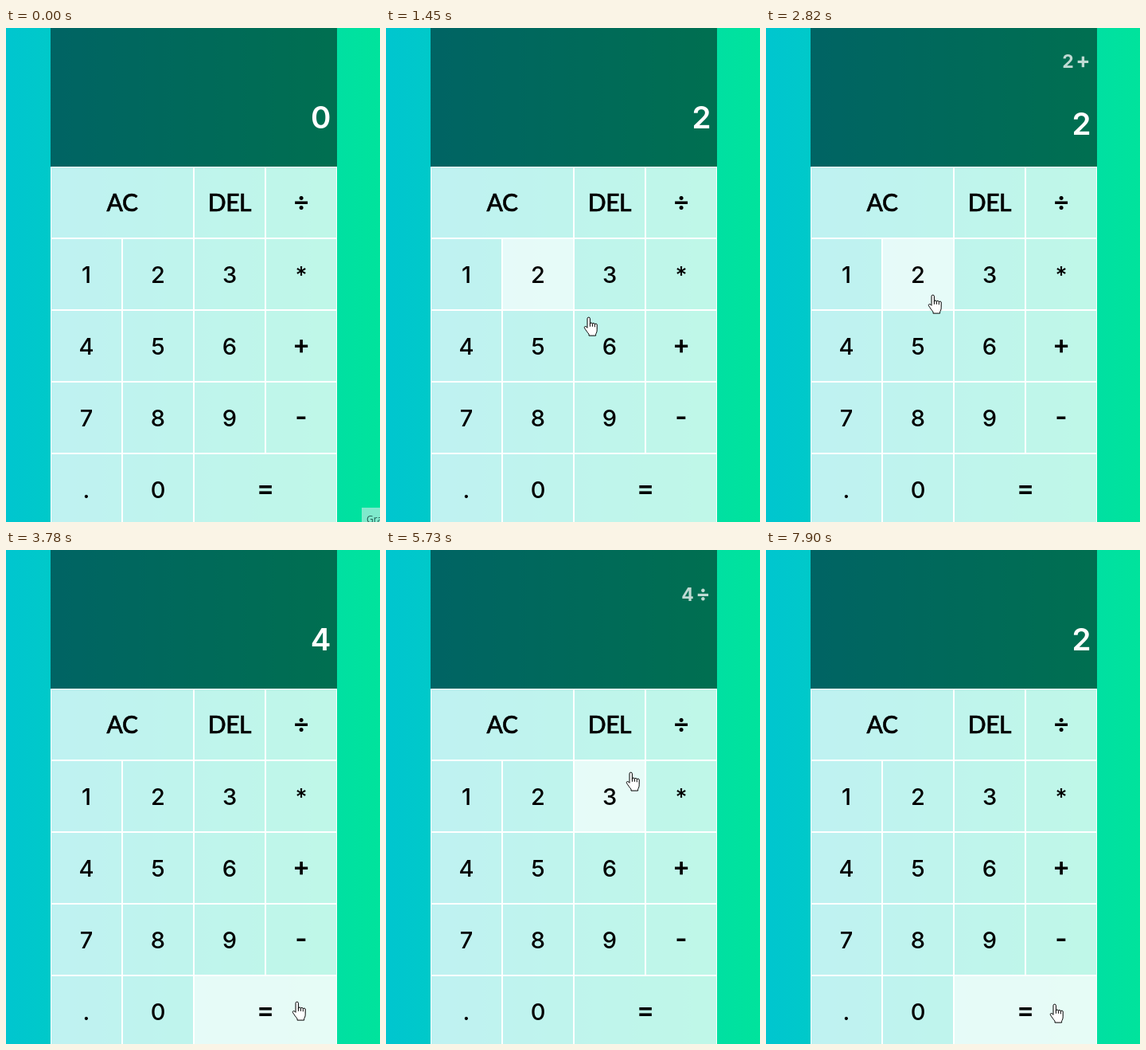
These frames come from a looping animation (470 by 620 pixels, 8 s). An HTML page:

```html
<!DOCTYPE html>
<html lang="en">
<head>
<meta charset="utf-8">
<title>Calculator</title>
<style>
  html, body { margin: 0; width: 100%; height: 100%; overflow: hidden; }
  svg { display: block; width: 470px; height: 620px; }
  text { font-family: Inter, "Open Sans", sans-serif; }
  .key { font-size: 29px; font-weight: 500; text-anchor: middle; }
  .sign { font-size: 33px; font-weight: 600; }
  .word { font-family: Lato, sans-serif; font-size: 30px; letter-spacing: -.4px; stroke: #000; stroke-width: .6px; }
  .out { font-weight: 600; fill: #fff; text-anchor: end; }
  #prev { font-size: 23px; font-weight: 700; fill-opacity: .75; word-spacing: -3px; }
  #prev .op { font-size: 27px; }
  #cur { font-size: 38.5px; }
  #tip text { font: 12px "Open Sans", sans-serif; fill: #245f55; }
</style>
</head>
<body>
<svg viewBox="0 0 470 620">
  <defs>
    <linearGradient id="sky" gradientUnits="userSpaceOnUse" x1="-438.5" x2="910.5" y1="0" y2="0">
      <stop offset="0" stop-color="#00aaff"/>
      <stop offset="1" stop-color="#00ff6c"/>
    </linearGradient>
  </defs>
  <rect width="470" height="620" fill="url(#sky)"/>
  <rect x="56" width="360" height="174" fill-opacity=".5"/>
  <text id="prev" class="out" x="407.5" xml:space="preserve"><tspan id="left"></tspan><tspan id="op" class="op"></tspan></text>
  <text id="cur" class="out" x="408.5"></text>
  <g id="keys"></g>
  <g id="tip">
    <rect x="447" y="602" width="23" height="18" fill="#7fe9cc"/>
    <text x="453" y="621">Gra</text>
  </g>
  <g id="pointer" fill="#fff" stroke="#000" stroke-linejoin="round">
    <g id="hand" transform="translate(-.5 .8)">
      <path d="M4.5 13.5V2a1.7 1.7 0 0 1 3.4 0V8.5a1.5 1.4 0 0 1 3 .2 1.4 1.3 0 0 1 2.9 .6 1.4 1.3 0 0 1 2.9 .9V16c0 3-1 4-1.6 5.5V23.3H6.5V21.5C5 19.5 2.5 16.5 .9 13.6 .3 11.6 2.5 10.8 4.5 13.5Z"/>
      <path d="M7.9 8V12M10.9 8.7V12M13.8 9.4V12.5" fill="none"/>
    </g>
    <path id="arrow" d="M.5 .8V16.5L4.2 13 6.6 18.5 8.8 17.5 6.5 12.2H11.5Z"/>
  </g>
</svg>
<script>
const LOOP = 8000, STEP = 70, CELL = 90, LEFT = 56, TOP = 174;
const $ = id => document.getElementById(id);

function add(parent, tag, attrs, text = '') {
  const el = document.createElementNS('http://www.w3.org/2000/svg', tag);
  for (const name in attrs) el.setAttribute(name, attrs[name]);
  el.textContent = text;
  return parent.appendChild(el);
}

function keyClass(label) {
  if (label.length > 1) return 'key word';
  return '÷+-='.includes(label) ? 'key sign' : 'key';
}

const rows = ['AC AC DEL ÷', '1 2 3 *', '4 5 6 +', '7 8 9 -', '. 0 = ='].map(r => r.split(' '));
const tiles = {};
rows.forEach((row, r) => row.forEach((label, c) => {
  if (tiles[label]) return;
  const x = LEFT + c * CELL, y = TOP + r * CELL;
  const w = row.filter(l => l === label).length * CELL;
  const type = keyClass(label), lift = type === 'key sign' ? 1.5 : 0;
  tiles[label] = add($('keys'), 'rect', { x, y, width: w, height: CELL, fill: '#fff' });
  add($('keys'), 'rect', { x: x + .5, y: y + .5, width: w - 1, height: CELL - 1, fill: 'none', stroke: '#fff' });
  add($('keys'), 'text', { x: x + w / 2, y: y + 56 - lift, class: type }, label);
}));

const presses = [[1110, '2'], [2210, '+'], [2680, '2'], [3510, '='], [5270, '÷'], [6220, '2'], [7170, '=']];
const math = { '+': (a, b) => a + b, '÷': (a, b) => a / b };

function calculate(t) {
  let left = '', op = '', cur = '0';
  for (const [time, key] of presses) {
    if (time > t) break;
    if (key === '=') {
      cur = String(math[op](+left, +cur));
      left = op = '';
    } else if (math[key]) {
      [left, op, cur] = [cur, key, ''];
    } else {
      cur = cur === '0' ? key : cur + key;
    }
  }
  return { left, op, cur };
}

// Each flick of the pointer: start, duration, and where it comes to rest
const entry = [425, 598];
const flicks = [
  [270, 770, 181, 296],
  [1310, 560, 336, 447],
  [1870, 140, 360, 398],
  [2210, 410, 204, 334],
  [2820, 490, 360, 566],
  [3780, 1090, 369, 227],
  [5520, 210, 302, 278],
  [5730, 620, 196, 352],
  [6410, 280, 381, 538],
  [6760, 340, 357, 569]
];

const easeOut = k => 1 - (1 - k) ** 2;

function pointerAt(t) {
  const i = flicks.filter(f => f[0] <= t).length - 1;
  if (i < 0) return null;
  const [start, length, ...to] = flicks[i];
  const from = i ? flicks[i - 1].slice(2) : entry;
  const time = Math.floor((t - start) / STEP) * STEP;
  const k = easeOut(Math.min(1, time / length));
  return from.map((v, axis) => Math.round(v + (to[axis] - v) * k));
}

function keyUnder(pos) {
  if (!pos) return null;
  const row = rows[Math.floor((pos[1] + 1 - TOP) / CELL)];
  return row && row[Math.floor((pos[0] + 5 - LEFT) / CELL)];
}

const show = (el, on) => el.setAttribute('visibility', on ? 'visible' : 'hidden');

function draw(t) {
  const { left, op, cur } = calculate(t);
  $('left').textContent = left && left + ' ';
  $('op').textContent = op;
  $('prev').setAttribute('y', cur ? 49.5 : 63.5);
  $('cur').textContent = cur;
  $('cur').setAttribute('y', op ? 134 : 126);

  // The highlight trails the pointer by one step
  const hot = keyUnder(pointerAt(t - STEP));
  for (const label in tiles) tiles[label].setAttribute('fill-opacity', label === hot ? .9 : .75);

  const pos = pointerAt(t), outside = pos && pos[0] >= LEFT + 4 * CELL;
  show($('hand'), pos && !outside);
  show($('arrow'), outside);
  if (pos) $('pointer').setAttribute('transform', `translate(${pos})`);
  show($('tip'), t < 70);
}

const begin = performance.now();
function tick() {
  draw((performance.now() - begin) % LOOP);
  requestAnimationFrame(tick);
}
tick();
</script>
</body>
</html>
```
